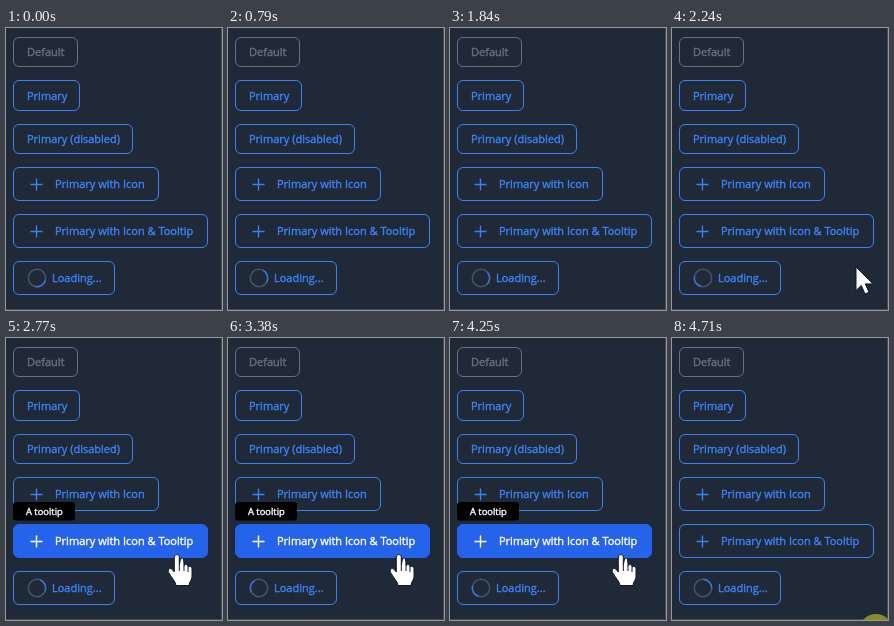
Recreate the animation shown at these times as an HTML page. Size 216 by 282 pixels, loop 4.78 s.

```html
<!DOCTYPE html>
<html lang="en">
<head>
<meta charset="utf-8">
<title>Button states</title>
<style>
html, body { margin: 0; width: 100%; height: 100%; overflow: hidden; background: #1f2937; }
svg { display: block; width: 100vw; height: 100vh; }
text { font: 500 11px "Open Sans", "Noto Sans", sans-serif; stroke-width: .4; }
</style>
</head>
<body>
<svg id="stage" viewBox="0 0 216 282">
  <rect width="216" height="282" fill="#1f2937"/>
  <path d="M0 281.5H215.5V0" fill="none" stroke="#444a54"/>
  <g id="buttons"></g>
  <g id="spinner" fill="none" stroke-width="1.5">
    <circle cx="31" cy="250" r="8.7" stroke="#45536b"/>
    <path id="arc" stroke="#3672df"/>
  </g>
  <g id="tip">
    <rect x="7" y="164" width="62" height="18.5" rx="3" fill="#000"/>
    <text x="20" y="177" fill="#fff" stroke="#fff" style="font-size:9.4px">A tooltip</text>
  </g>
  <circle id="halo" r="17" fill="#8b8a2b"/>
  <path id="arrow" d="M0 0V23.5L5.3 18.4L9 27L13 25.2L9.3 16.9H17Z" fill="#fff" stroke="#111827" stroke-width="1"/>
  <g id="hand" stroke="#111827" stroke-width="1" stroke-linejoin="round">
    <path fill="#fff" d="M-2.7 2C-2.7-1.2 2.3-1.2 2.3 2V10C4 0 7 .5 7 11C8.5 8.5 11 9.5 11 12C13 10.5 15 12 15 14V22C15 25 12 27 12 30.5H-1C-1.5 26-5.5 23-8.4 17.5C-10 14-6.5 12-4.6 14.8L-2.7 17Z"/>
    <path fill="none" d="M2.3 10V16M7 11V16M11 12V17"/>
  </g>
</svg>
<script>
const LOOP = 4780, NS = "http://www.w3.org/2000/svg";
const BLUE = "#3b82f6", GRAY = "#667080";
const $ = id => document.getElementById(id);

function add(parent, tag, attrs, label) {
  const el = document.createElementNS(NS, tag);
  for (const k in attrs) el.setAttribute(k, attrs[k]);
  if (label) el.textContent = label;
  parent.append(el);
  return el;
}

// label, top, width, height, text x, plus icon
const specs = [
  ["Default", 9, 65, 30, 21],
  ["Primary", 52, 67, 31, 21],
  ["Primary (disabled)", 96, 120, 30, 21],
  ["Primary with Icon", 139, 146, 34, 49, true],
  ["Primary with Icon & Tooltip", 186, 195, 34, 49, true],
  ["Loading...", 233, 102, 34, 46]
];

const buttons = specs.map(([label, y, w, h, tx, plus], i) => {
  const color = i ? BLUE : GRAY, mid = Math.ceil(y + h / 2);
  const box = add($("buttons"), "rect", { x: 7.5, y: y + .5, width: w - 1, height: h - 1, rx: 5.5, fill: "none", stroke: color });
  const text = add($("buttons"), "text", { x: tx, y: mid + 4, fill: color, stroke: color }, label);
  const icon = plus && add($("buttons"), "path", { d: `M24.5 ${mid + .5}h12m-6-6v12`, stroke: color, "stroke-width": 1.4 });
  return { box, text, icon };
});

// time, x, y of the pointer's hot spot
const track = [
  [2080, 207, 286], [2240, 184, 239], [2640, 171, 217],
  [4380, 171, 217], [4520, 172, 231], [4660, 204, 293], [LOOP, 204, 293]
];

function pointer(t) {
  const i = track.findIndex(p => p[0] > t);
  if (i < 1) return null;
  const [a, x, y] = track[i - 1], [b, u, v] = track[i];
  const p = (t - a) / (b - a), e = p * p * (3 - 2 * p);
  return [x + (u - x) * e, y + (v - y) * e];
}

const show = (el, on) => el.setAttribute("visibility", on ? "visible" : "hidden");
const place = (el, [x, y]) => el.setAttribute("transform", `translate(${x} ${y})`);
const rim = deg => {
  const a = deg * Math.PI / 180;
  return `${31 + 8.7 * Math.sin(a)} ${250 - 8.7 * Math.cos(a)}`;
};

function draw(t) {
  const turn = t * .36 + 150;
  $("arc").setAttribute("d", `M${rim(turn - 45)}A8.7 8.7 0 0 1 ${rim(turn + 45)}`);

  const pos = pointer(t);
  const hover = !!pos && pos[1] < 220;
  const { box, text, icon } = buttons[4];
  const ink = hover ? "#fff" : BLUE;
  box.setAttribute("fill", hover ? "#2563eb" : "none");
  box.setAttribute("stroke", hover ? "#2563eb" : BLUE);
  text.setAttribute("fill", ink);
  text.setAttribute("stroke", ink);
  icon.setAttribute("stroke", ink);
  show($("tip"), hover);
  show($("hand"), hover);
  show($("arrow"), pos && !hover);
  show($("halo"), t >= 4600);
  if (pos) [$("arrow"), $("hand"), $("halo")].forEach(el => place(el, pos));
}

function tick() {
  draw(performance.now() % LOOP);
  requestAnimationFrame(tick);
}
tick();
</script>
</body>
</html>
```
